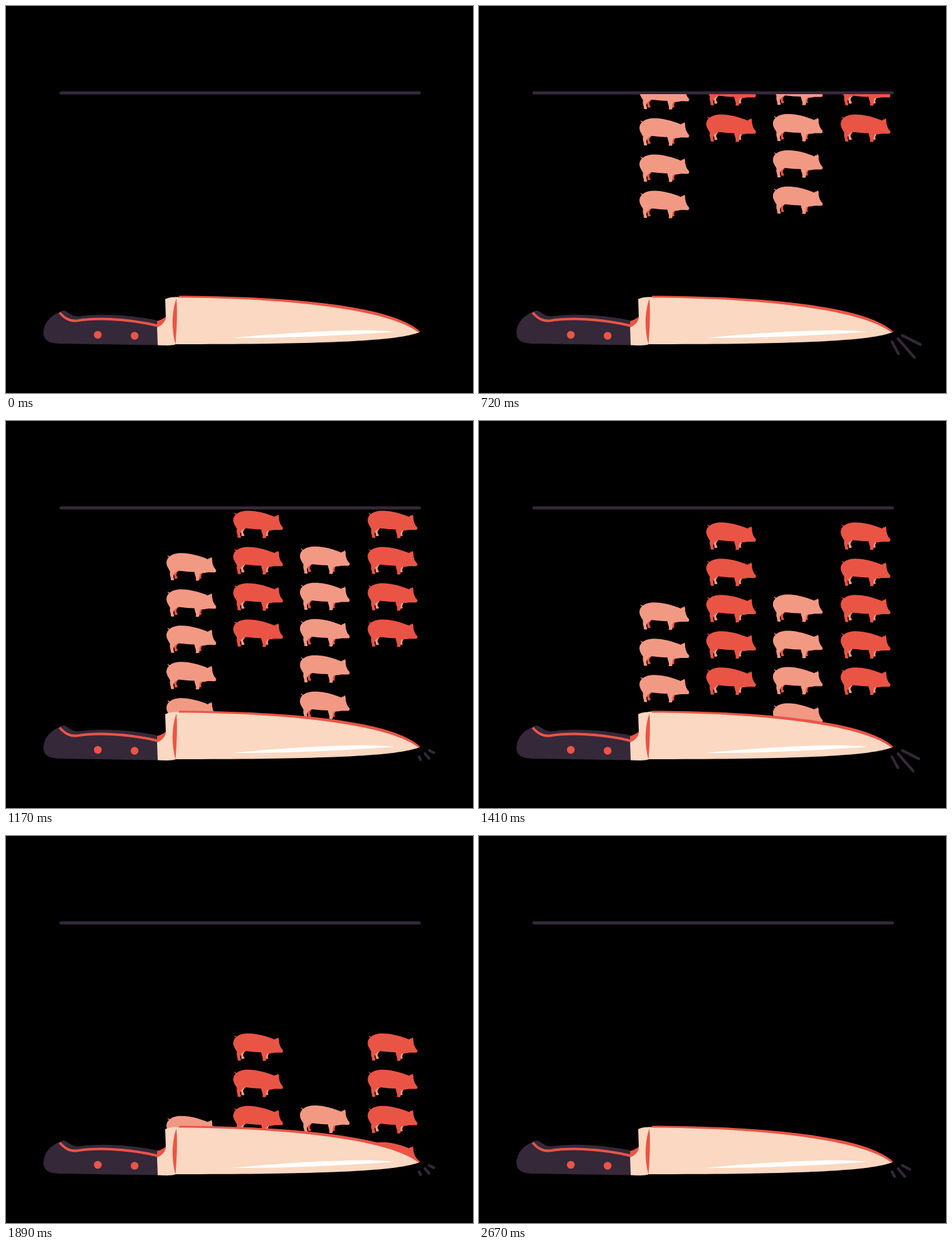
Animation, 748 px wide and 619 px high, one loop 2700 ms. Source, as an HTML page:

```html
<!DOCTYPE html>
<html lang="en">
<head>
<meta charset="utf-8">
<title>Knife and pigs</title>
<style>
  html, body { margin: 0; width: 100%; height: 100%; overflow: hidden; background: #000; }
  svg { display: block; width: 100%; height: 100%; }
  .dark { fill: #352839; }
  .red { fill: #ea5546; }
  .peach { fill: #fad8c1; }
  .line { fill: none; stroke: #352839; stroke-linecap: round; }
</style>
</head>
<body>
<svg viewBox="0 0 748 619">
  <defs>
    <clipPath id="gap"><path d="M0 141H748V521H663L500 505H0Z"/></clipPath>
    <path id="body" d="M4.2 6.4C2.2 5.8 1.4 4.4 2.4 2.8L3 4.4 5.4 5.2C10 1.6 16 0 24 0C38 0 53 4.4 66.5 9.8
      C67 8.6 68.4 7.9 69.8 8.2C70.4 7.2 71.4 6.8 72 6.4C73.4 8.6 73.4 11 73.2 13
      C74 18.5 75.8 23 79.2 26.4C80 27.6 79.6 29.6 78.6 30.6C73.5 31.2 68 30.2 64 31.2
      C60 32 56 31.6 54.2 32.6C52.8 35.4 52.4 38 52.8 40.6C53 42.2 52.4 43.4 51.4 44
      L47.4 43.8C46.6 43.2 46.6 42.4 47.4 41.6C47.4 37.6 45 34 44.8 30.2
      C36 30 26 29 18.6 28.2C16 30 13 31.6 11.6 34.4C10.8 36.8 11 39.2 12.2 41
      C12.4 42.4 12 43.2 11.2 43.6L7.6 43.2C6.8 42.6 6.6 41 7 39.6
      C6 36.8 4.8 33.2 5.8 29.4C4.6 26 0 21.6 0 15.4C0 11.4 1.8 8.2 4.2 6.4Z"/>
    <path id="legs" d="M11 33C13 30.6 15.4 28.6 18.4 27L19.6 28.4C17 30.4 16 32.6 15.8 34.8
      C16.4 37 17.6 38 18 39.6L16.6 40.8 13 40.6C13.2 37.4 12.6 35 11 33Z
      M52 31L58.4 30.6C56.4 33 55.2 35.6 55.4 38C56 38.8 56.2 39.4 56 40.4L51.6 40.6Z"/>
  </defs>

  <path class="line" stroke-width="5" d="M88 139H662"/>
  <g id="herd" clip-path="url(#gap)"></g>

  <path class="dark" d="M243 542.5L85 540C68 539.5 60 534 60 523C60 506 73 493 92 487
    C99 487.5 103 496.5 117 496.5C155 490.5 204 495 243 503Z"/>
  <path fill="none" stroke="#ea5546" stroke-width="4" d="M86 490.5C94 499.5 101 503.8 112 503.6C140 499 190 498.5 243 511.5"/>
  <circle class="red" cx="147" cy="526" r="6.2"/>
  <circle class="red" cx="206" cy="527.5" r="6.2"/>

  <path class="red" d="M242 504C249 502 253 499.5 257 496V505L242 515Z"/>
  <path class="peach" d="M255 469C262 465.5 268 465.5 277 465.5C430 465.5 612 480 662 522
    C632 533 560 541 272 541C266 543.5 256 543 243 542.5L242 514C249 511 255 506 256 499Z"/>
  <path class="red" d="M277 463.5C430 464 616 476 663.5 521L661 522.5C610 482 428 467 277 466.5Z"/>
  <path class="red" d="M273 468C265 489 265 520 271.5 541C273 522 275 492 273 468Z"/>
  <path fill="#fff" d="M362 531C420 525 510 518.5 575 518.8C600 519 612 520 622 521C560 526 450 531.5 362 531Z"/>

  <g id="rays" class="line" stroke-width="4.2"></g>
</svg>
<script>
const STEP = 30, FRAMES = 90, ROW = 58, PER_COLUMN = 5, BURST = 12;
const PINK = '#f29984', RED = '#e95445';

// x, start y of the lowest pig, fall per step, body and far-leg colours
const columns = [
  [257, 59.2, 9.85, PINK, RED],
  [364, -57, 9.6, RED, PINK],
  [470.8, 58.3, 9.6, PINK, RED],
  [579.3, -57, 9.6, RED, PINK]
];
// start point and full extent of each ray
const rays = [[678, 527, 29, 14.5], [671, 532, 26.7, 30.5], [661.5, 537, 10.2, 19]];

function add(parent, tag, attrs) {
  const el = document.createElementNS('http://www.w3.org/2000/svg', tag);
  for (const key in attrs) el.setAttribute(key, attrs[key]);
  return parent.appendChild(el);
}

const herd = document.getElementById('herd');
const groups = columns.map(([, , , body, legs]) => {
  const group = add(herd, 'g', {});
  for (let i = 0; i < PER_COLUMN; i++) {
    add(group, 'use', { href: '#legs', y: -i * ROW, fill: legs });
    add(group, 'use', { href: '#body', y: -i * ROW, fill: body });
  }
  return group;
});
const rayBox = document.getElementById('rays');
const rayPaths = rays.map(() => add(rayBox, 'path', {}));

function draw(ms) {
  const n = Math.floor(ms / STEP) % FRAMES;
  columns.forEach(([x, y, fall], i) =>
    groups[i].setAttribute('transform', `translate(${x} ${y + fall * n})`));

  const grow = n ? ((n - 1) % BURST + 1) / BURST : 0;
  rayBox.style.display = n ? '' : 'none';
  rays.forEach(([x, y, dx, dy], i) =>
    rayPaths[i].setAttribute('d', `M${x} ${y}l${dx * grow} ${dy * grow}`));
}

let start;
function tick(now) {
  start ??= now;
  draw(now - start);
  requestAnimationFrame(tick);
}
draw(0);
requestAnimationFrame(tick);
</script>
</body>
</html>
```
